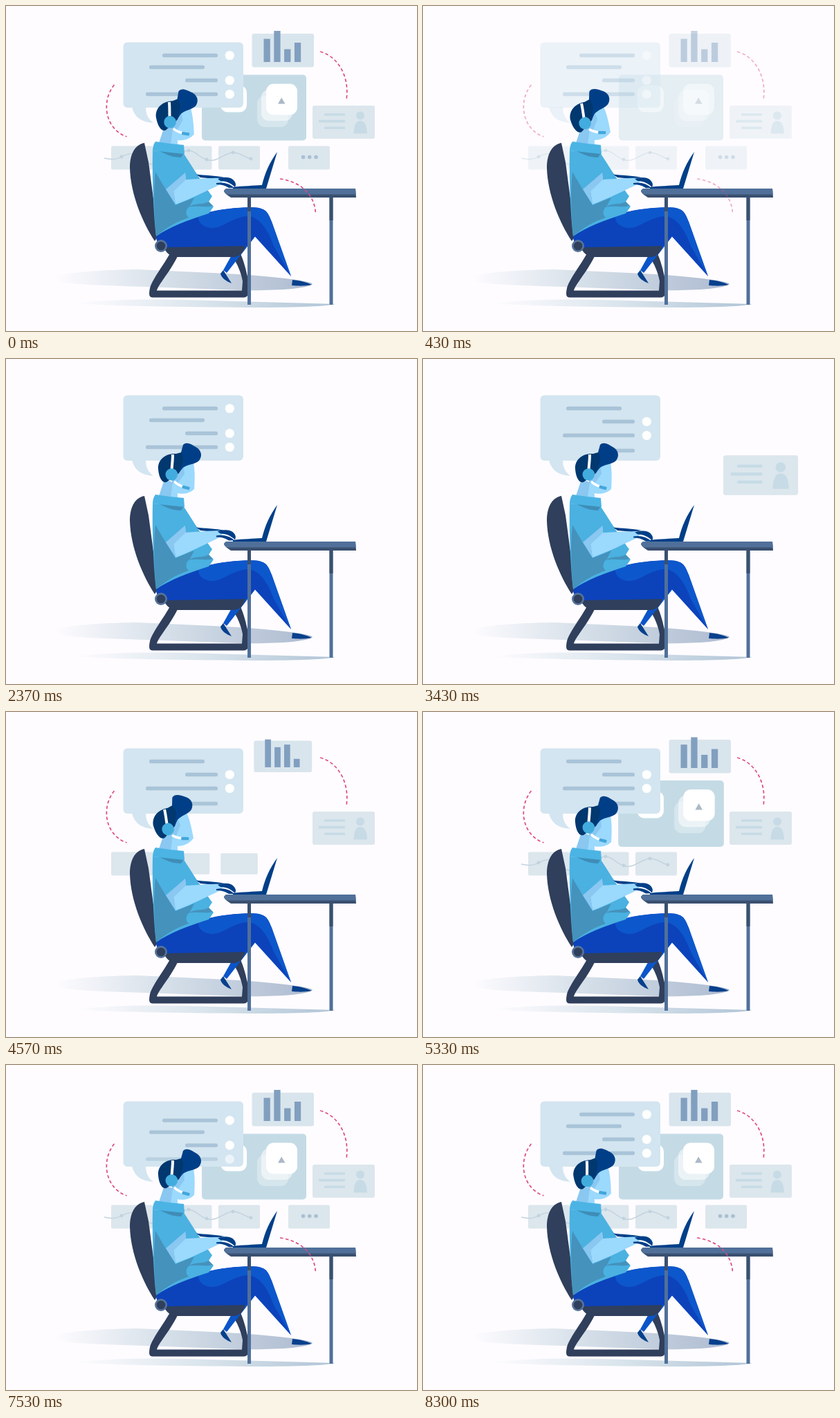
Animation, 594 px wide and 470 px high, one loop 8.33 s. Source, as an HTML page with a canvas:

```html
<!DOCTYPE html>
<html lang="en">
<head>
<meta charset="utf-8">
<title>Support desk</title>
<style>
html, body { margin: 0; width: 100%; height: 100%; overflow: hidden; background: #fefcff; }
canvas { display: block; width: 594px; height: 470px; }
</style>
</head>
<body>
<canvas id="stage" width="594" height="470"></canvas>
<script>
const ctx = document.getElementById('stage').getContext('2d');
const LOOP = 8330;
const NAVY = '#2f3f5c', STEEL = '#50709a', STEEL_DARK = '#3a5070', INK = '#003f88';
const SKIN = '#9bd9fd', SKIN_DARK = '#8ac7f1', SHIRT = '#4ab1e1', SHIRT_DARK = '#4592bc';
const CARD = '#dce6ed', PINK = '#dd4a86';

const clamp = x => Math.max(0, Math.min(1, x));
const span = (t, start, length) => clamp((t - start) / length);
const smooth = u => u * u * (3 - 2 * u);
const mix = (a, b, u) => a + (b - a) * u;

function backOut(u, s) {
  const w = u - 1;
  return 1 + (s + 1) * w * w * w + s * w * w;
}

// Eased value between [time, value] keys
function track(t, keys) {
  let value = keys[0][1];
  for (let i = 1; i < keys.length; i++) {
    const [t0, v0] = keys[i - 1], [t1, v1] = keys[i];
    if (t >= t0) value = mix(v0, v1, smooth(span(t, t0, t1 - t0)));
  }
  return value;
}

function fill(d, color, rule) {
  ctx.fillStyle = color;
  ctx.fill(new Path2D(d), rule || 'nonzero');
}

function box(x, y, w, h, r, color) {
  ctx.fillStyle = color;
  ctx.beginPath();
  ctx.roundRect(x, y, w, h, r);
  ctx.fill();
}

function disc(x, y, r, color) {
  ctx.fillStyle = color;
  ctx.beginPath();
  ctx.arc(x, y, r, 0, Math.PI * 2);
  ctx.fill();
}

function stroke(d, color, width, dash) {
  ctx.strokeStyle = color;
  ctx.lineWidth = width;
  ctx.setLineDash(dash || []);
  ctx.stroke(new Path2D(d));
  ctx.setLineDash([]);
}

function withAlpha(a, draw) {
  if (a <= 0) return;
  ctx.save();
  ctx.globalAlpha *= a;
  draw();
  ctx.restore();
}

// Panels leave together early in the loop, then each returns at its own start
const leaving = t => 1 - smooth(span(t, 60, 700));

function pop(t, start, length, x, y, bounce, draw) {
  const back = t >= start;
  const u = span(t, start, length);
  const scale = back ? backOut(u, bounce) : 1;
  if (scale <= 0) return;
  withAlpha(back ? clamp(u * 5) : leaving(t), () => {
    ctx.translate(x, y);
    ctx.scale(scale, scale);
    ctx.translate(-x, -y);
    draw();
  });
}

function arc(t, start, d, length) {
  const back = t >= start;
  const end = length * (back ? smooth(span(t, start, 400)) : 1);
  const dash = [];
  for (let at = 0; at < end; at += 8) dash.push(Math.min(4.6, end - at), 3.4);
  if (!dash.length) return;
  dash[dash.length - 1] = 999;
  withAlpha(back ? 1 : leaving(t), () => stroke(d, PINK, 1.7, dash));
}

function shadow(d, x0, x1, middle, end) {
  const g = ctx.createLinearGradient(x0, 0, x1, 0);
  g.addColorStop(0, '#fefcff');
  g.addColorStop(0.5, middle);
  g.addColorStop(1, end);
  fill(d, g);
}

function floor() {
  shadow('M70 392C72 386 150 381 190 381L320 387C390 391 443 398 443 402C438 409 385 412 340 411L200 406C110 403 68 402 70 392Z', 70, 420, '#d2dde7', '#b2bfd3');
  shadow('M98 430C150 424 210 424 260 425L476 431C460 435 410 436 350 436C250 435 150 434 98 430Z', 98, 476, '#d9e4ec', '#b0c4d6');
}

function bigPanel(t) {
  pop(t, 5150, 420, 358, 147, 1.4, () => {
    box(283, 99.5, 151, 95, 5, '#c4dbe5');
    box(310, 115, 38, 38.5, 10, '#fff');
    withAlpha(0.3, () => box(363, 130, 45, 45, 11, '#fff'));
    withAlpha(0.55, () => box(369, 121, 45, 45, 11, '#fff'));
    box(376, 112.5, 45, 45, 11, '#fff');
    fill('M393 141.5H403.5L398.2 132.5Z', '#aab9c7');
  });
}

const MESSAGES = [
  { y: 0, x0: 226, x1: 306, dot: true },
  { y: 17, x0: 207, x1: 287 },
  { y: 36, x0: 259, x1: 306, dot: true },
  { y: 56, x0: 202, x1: 306, dot: true },
  { y: 78, x0: 259, x1: 306 }
];
const PERIOD = 99;

function messages(t) {
  const scroll = track(t, [
    [0, 0], [2500, 0], [3250, 17], [5700, 17], [6350, 36],
    [6400, 36], [6760, 56], [6840, 56], [7200, 78], [7290, 78], [7720, PERIOD]
  ]);
  for (let k = -1; k < 3; k++) {
    for (const m of MESSAGES) {
      const y = 71.5 + m.y + k * PERIOD - scroll;
      withAlpha(clamp((y - 62) / 8) * clamp((142 - y) / 10), () => {
        box(m.x0, y - 2.7, m.x1 - m.x0, 5.4, 2.5, '#a9c3d8');
        if (m.dot) disc(323.3, y, 6.6, '#fff');
      });
    }
  }
}

function bubble(t) {
  pop(t, 1400, 400, 170, 150, 1.05, () => {
    box(169.5, 52.5, 173.5, 94.5, 6, '#d3e5f0');
    fill('M182 146C185 160 195 168 213 169C205 163 202 156 202 146Z', '#d3e5f0');
    messages(t);
  });
}

function chart(t) {
  pop(t, 4460, 450, 400, 64, 2.6, () => {
    box(355.5, 40, 89.5, 48.5, 3, '#d9e5ed');
    const from = [43, 31, 35, 13], to = [33.5, 45, 18.5, 28];
    const u = t < 4460 ? 1 : smooth(span(t, 4800, 600));
    from.forEach((h, i) => {
      const now = mix(h, to[i], u);
      box(372.5 + i * 14.8, 81 - now, 9.3, now, 0, '#819fbf');
    });
  });
}

function profile(t) {
  pop(t, 3195, 450, 488, 168, 2.6, () => {
    box(443, 144, 90, 48, 3, CARD);
    box(460, 155.2, 30, 3.6, 1, '#c6dbe5');
    box(452, 164.8, 38, 3.6, 1, '#c6dbe5');
    box(460, 174.4, 30, 3.6, 1, '#c6dbe5');
    disc(512, 158.5, 6, '#c6dbe5');
    fill('M502.5 184.5C503 172 506 166 512 166C518 166 521.5 172 522 184.5Z', '#c6dbe5');
  });
}

const PLOT = 'M142 220C152 222 158 223 167 218C180 211 188 213 196 220C206 231 216 231 228 226C244 218 254 209 264 209C274 209 280 220 290 222C304 228 316 212 328 212C340 212 346 220 354 221';

function card(t, start, x) {
  pop(t, start, 450, x + 30, 219.5, 1.7, () => box(x, 202.5, 60, 34, 2, CARD));
}

function strip(t) {
  card(t, 4130, 152);
  card(t, 4440, 237.5);
  card(t, 4440, 307);
  const back = t >= 4700;
  const u = back ? smooth(span(t, 4700, 500)) : 1;
  if (u > 0) {
    withAlpha(back ? 1 : leaving(t), () => {
      stroke(PLOT, '#c1d3de', 1.4, [240 * u, 999]);
      for (const [x, y] of [[167, 218], [264, 209], [290, 222], [328, 212], [354, 221]]) {
        if (142 + 212 * u >= x) disc(x, y, 2.4, '#c1d3de');
      }
    });
  }
  pop(t, 5450, 400, 438, 219.5, 1.7, () => {
    box(408, 202.5, 60, 34, 2, CARD);
    for (const x of [429.5, 438.7, 448]) disc(x, 218.5, 2.8, '#a9c0d2');
  });
}

function chair() {
  fill('M200 198C188 200 179 212 179 234C180 273 198 314 215 340L221 331C217 310 211 262 206 226Z', NAVY);
  fill('M238 356C227 376 211 396 208 408C206 418 207 421.5 212 421.5H344C353 421 352 408 350 396C347 382 344 369 338 356ZM248 362H327C334 372 340 386 342 398L341 411.5H218C220 403 236 386 248 362Z', NAVY, 'evenodd');
}

function legs() {
  fill('M362 331L319 386L314 382L333 348Z', '#0b55ca');
  fill('M343 335L331 345L325 358L346 347Z', '#24406f');
  fill('M217 334C230 320 255 308 290 299C312 293 342 290.5 361 291.5C377 293 379 300 384 312L412 391L359.5 333C352 344 348 348 340 349L236 350C224 350 217 342 217 334Z', '#0c43bb');
  fill('M278 303C300 294 345 290.5 361 291.5C377 293 379 300 384 312L412 391L387 347C378 322 366 304 348 304C326 306 312 322 296 321C282 319 277 311 278 303Z', '#0d57cc');
  fill('M414 396C425 397 436 400 442 403C434 405 422 405 413 404Z', '#07408c');
  fill('M314 382L326 401C318 398 311 393 310 387Z', '#07408c');
  fill('M228 349L346 347C343 357 338 362 330 363H246C236 362 231 356 228 349Z', NAVY);
  disc(224, 347, 9, '#56739a');
  disc(224, 347, 6.3, NAVY);
}

function torso() {
  fill('M229 174L221 198L248 201L246 180Z', SKIN_DARK);
  fill('M241 178L238 200L248 201L247 186Z', SKIN);
  fill('M212 209C211 245 213 300 217 333C235 320 264 309 293 300L300 290L293 283L298 275C288 262 270 234 256 212Z', SHIRT);
  fill('M216 240L230 264L245 288L272 277L266 289C259 294 259 302 264 306C245 312 230 322 217 333C214 300 213 265 216 240Z', SHIRT_DARK);
  fill('M264 291C273 284 284 288 293 283L299 289C288 292 277 288 264 291Z', SHIRT_DARK);
  fill('M221 209L257 213L253 219C241 219 231 215 221 209Z', '#3f8db7');
  fill('M216 196C230 198 244 200 257 201L258 214C242 212 226 211 212 209C212 204 213 200 216 196Z', '#4bb4e4');
}

function arm(t) {
  fill('M275 243.5C288 245 302 245 316 248L302 250L281 248Z', INK);
  ctx.save();
  ctx.translate(240, 272);
  ctx.rotate(0.008 * Math.sin(t / LOOP * Math.PI * 40));
  ctx.translate(-240, -272);
  fill('M259 241L260 251C280 250 302 248 318 249L308 259C290 267 270 278 245 287L242 268Z', SKIN);
  fill('M259 241L260 251L242 268L245 287L231 265Z', SKIN_DARK);
  fill('M306 250C314 247 323 247 328 251C332 255 333 258 331 262C326 257 319 253 310 253Z', INK);
  fill('M304 256C314 254 324 257 330 263L322 263C316 259 310 258 304 258Z', INK);
  ctx.restore();
}

function head(t) {
  // Two slow nods per loop
  const half = LOOP / 2;
  const phase = (t + 250) % half;
  const tilt = -0.236 * track(phase, [[0, 0], [560, 1], [880, 1], [1440, 0]]);
  ctx.save();
  ctx.translate(247, 190);
  ctx.rotate(tilt);
  ctx.translate(-247, -190);
  fill('M240 155L271 150C273 160 273 174 272 188C264 196 252 196 243 193Z', SKIN);
  fill('M240 155L256 150L258 166L248 180L240 180Z', SKIN_DARK);
  fill('M246 137C229 136 219 147 220 159C221 172 226 180 232 178L250 165L258 152L257 134Z', '#00386f');
  fill('M256 124C261 119 268 123 277 129C284 135 283 143 278 148C271 153 263 152 256 157L250 164C254 152 260 144 253 135Z', INK);
  stroke('M241 138C241 146 240 152 239.5 160', '#fff', 4);
  disc(239.3, 167, 8.8, '#43acde');
  stroke('M243 177C247 181 251 183 257 185', '#fff', 3.6);
  ctx.translate(260, 186);
  ctx.rotate(0.25);
  box(-5.5, -2.2, 11, 4.4, 1, '#43a6da');
  ctx.restore();
}

function desk() {
  fill('M328 262C343 260 358 260 370 259C374 242 381 226 392 211L376 264H328Z', INK);
  for (const [x, dark] of [[349, 20], [467.5, 33]]) {
    box(x, 277, 5, 155, 0, STEEL);
    box(x, 277, 5, dark, 0, STEEL_DARK);
  }
  fill('M318 264H505L506 277H325C320 274 315 270 315 267Z', STEEL_DARK);
  fill('M318 264H505L505.7 272.5H319C316 270 315 268 315 267Z', STEEL);
}

function draw(t) {
  ctx.fillStyle = '#fefcff';
  ctx.fillRect(0, 0, 594, 470);
  floor();
  bigPanel(t);
  bubble(t);
  chart(t);
  profile(t);
  strip(t);
  arc(t, 3700, 'M454 66C478 72 497 100 492 135', 86);
  arc(t, 3800, 'M156.5 114C137 138 143 178 174.5 189', 94);
  chair();
  legs();
  torso();
  head(t);
  arm(t);
  desk();
  arc(t, 5750, 'M396 250C425 254 447 272 447.5 302', 78);
}

const begin = performance.now();
function frame() {
  draw((performance.now() - begin) % LOOP);
  requestAnimationFrame(frame);
}
frame();
</script>
</body>
</html>
```
